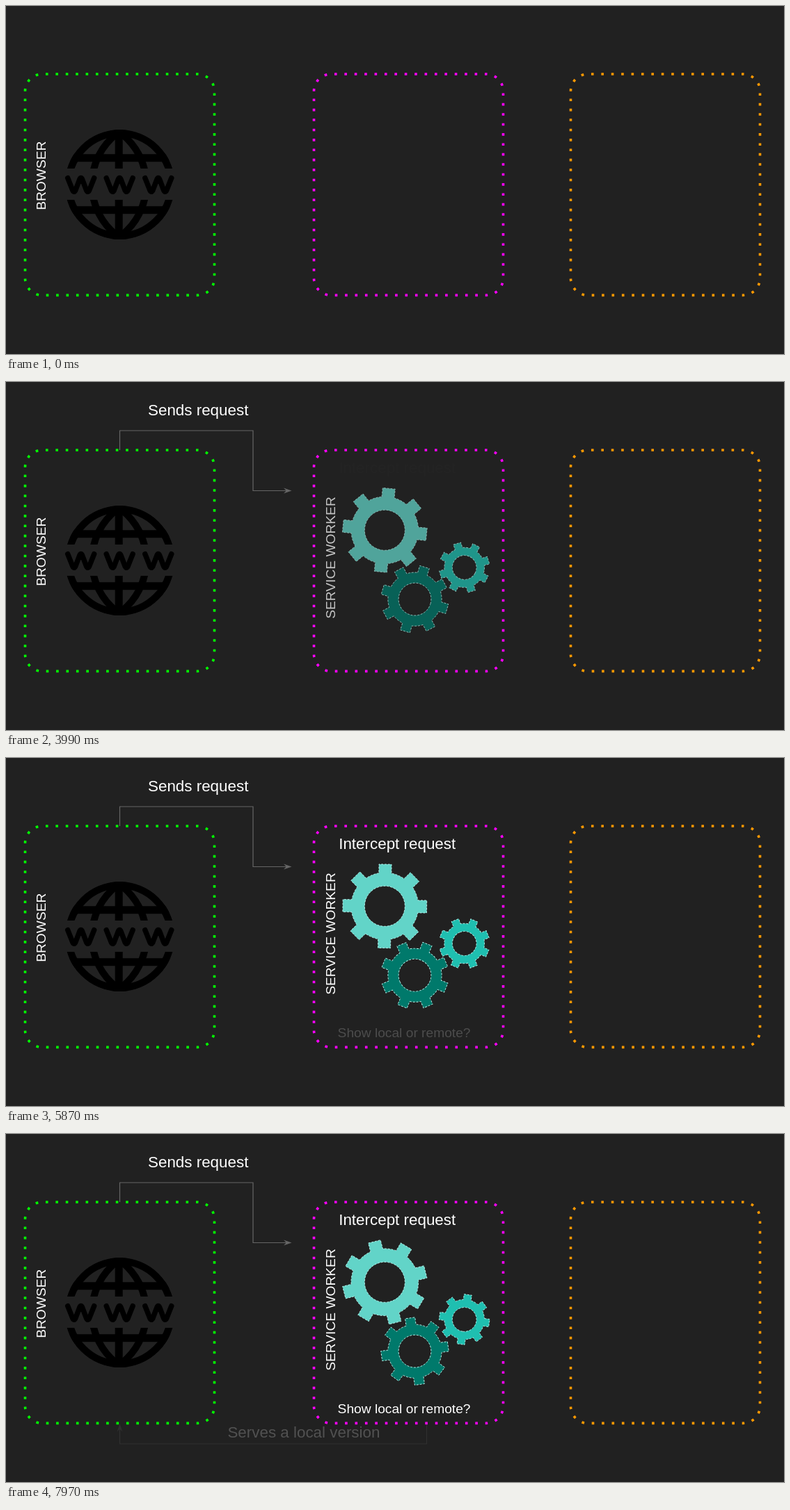
Animation, 1118 px wide and 501 px high, one loop 8000 ms. Source, as an HTML page:

```html
<!DOCTYPE html>
<html lang="en">
<head>
<meta charset="utf-8">
<title>Service worker request flow</title>
<style>
  html, body { margin: 0; width: 100%; height: 100%; overflow: hidden; background: #212121; }
  svg { display: block; width: 1118px; height: 501px; }
  text { fill: #fff; font: 22.4px "Liberation Sans", Arial, sans-serif; white-space: pre; }
  .small { font-size: 19.2px; }
  .panel { fill: none; stroke-width: 3.6; stroke-dasharray: 3.6 10.8; }
  .line { fill: none; stroke: #666; stroke-width: 1.2; }
  .head { fill: #666; }
  .gear { stroke: #b4efe8; stroke-width: .9; stroke-dasharray: 3 1.8; fill-rule: evenodd; }
</style>
</head>
<body>
<svg viewBox="0 0 1118 501" xmlns="http://www.w3.org/2000/svg">
  <defs>
    <clipPath id="caps"><path d="M80 170H250V234H80ZM80 279H250V345H80Z"/></clipPath>
    <clipPath id="disc"><circle cx="163.5" cy="257" r="79"/></clipPath>
    <path id="w" d="M0 0 L7.2 18 Q9 21.5 11 18 L17.2 1.8 Q19 -2 20.8 1.8 L27 18 Q29 21.5 30.8 18 L38 0"/>
  </defs>
  <g id="panels"></g>

  <g clip-path="url(#caps)">
    <g clip-path="url(#disc)" fill="none" stroke="#000">
      <circle cx="163.5" cy="257" r="74" stroke-width="10.5"/>
      <circle cx="216.5" cy="257" r="93" stroke-width="10"/>
      <circle cx="108.5" cy="257" r="93" stroke-width="10"/>
      <path stroke-width="11" d="M162.2 178V336M80 218.7H250M80 293.8H250"/>
    </g>
  </g>
  <g fill="none" stroke="#000" stroke-width="7.4" stroke-linecap="round" stroke-linejoin="round">
    <use href="#w" x="88.7" y="247.6"/>
    <use href="#w" x="144.2" y="247.6"/>
    <use href="#w" x="199.8" y="247.6"/>
  </g>
  <text class="small" transform="translate(57.4 293.8) rotate(-90)">BROWSER</text>

  <g id="send">
    <path class="line" d="M163.5 98V70H355V156.5H404"/>
    <path class="head" d="M410.5 156.5L399 160.4L402.8 156.5L399 152.6Z"/>
    <text x="204" y="48">Sends request</text>
  </g>
  <g id="worker">
    <text class="small" transform="translate(472.5 340.8) rotate(-90)">SERVICE WORKER</text>
    <g id="gears"></g>
  </g>
  <text id="intercept" x="478.2" y="131.3">Intercept request</text>
  <text id="choose" class="small" x="476.6" y="402">Show local or remote?</text>
  <g id="serve">
    <path class="line" d="M604.5 414V446H163.5V424"/>
    <path class="head" d="M163.5 417L167.4 428.5L163.5 424.7L159.6 428.5Z"/>
    <text x="318.4" y="437">Serves a local version</text>
  </g>
</svg>
<script>
const LOOP = 8000;
const byId = id => document.getElementById(id);

function add(parent, attrs) {
  const el = document.createElementNS("http://www.w3.org/2000/svg", "path");
  for (const key in attrs) el.setAttribute(key, attrs[key]);
  parent.appendChild(el);
  return el;
}

// Rounded panels; the dotted line starts at the top of the left side.
function panel(x, stroke) {
  const r = 24.5, arc = `a${r} ${r} 0 0 1 `;
  const d = `M${x} ${98 + r}${arc}${r} ${-r}h223${arc}${r} ${r}v269.4` +
            `${arc}${-r} ${r}h-223${arc}${-r} ${-r}Z`;
  add(byId("panels"), { d, stroke, class: "panel" });
}
panel(27.5, "#0f0");
panel(442.5, "#f0f");
panel(811.5, "#f90");

function gearPath(tip, body, hole, width) {
  const half = width / 2, base = Math.sqrt(body * body - half * half);
  let d = "";
  for (let i = 0; i < 8; i++) {
    const a = i * Math.PI / 4, c = Math.cos(a), s = Math.sin(a);
    const at = (x, y) => `${(x * c - y * s).toFixed(2)} ${(x * s + y * c).toFixed(2)}`;
    d += (i ? `A${body} ${body} 0 0 1 ` : "M") + at(-half, -base) +
         `L${at(-half, -tip)}L${at(half, -tip)}L${at(half, -base)}`;
  }
  return d + `A${body} ${body} 0 0 1 ${-half} ${-base}Z` +
    `M${hole} 0A${hole} ${hole} 0 1 0 ${-hole} 0A${hole} ${hole} 0 1 0 ${hole} 0Z`;
}

// dir and offset relate each wheel to the large one.
const gears = [
  { x: 544.3, y: 213.3, size: [60.3, 48.3, 29, 18], fill: "#62d4c8", dir: 1, offset: 0 },
  { x: 587.5, y: 312.7, size: [48.3, 38.6, 23.4, 14.2], fill: "#00796b", dir: -1, offset: 22.5 },
  { x: 658.7, y: 267, size: [36, 28.8, 17.4, 11], fill: "#1fbfb0", dir: 1, offset: 22.5 }
];
for (const g of gears)
  g.el = add(byId("gears"), { d: gearPath(...g.size), fill: g.fill, class: "gear" });

// The picture advances in discrete steps: [start, steps until the next start].
const beats = [[0, 1], [1010, 9], [2450, 11], [3270, 11], [4140, 11], [5000, 11],
               [5870, 11], [6730, 11], [7580, 11], [8438, 1]];

function hold(t) {
  let i = beats.length - 2;
  while (beats[i][0] > t) i--;
  const [start, count] = beats[i];
  const step = (beats[i + 1][0] - start) / count;
  const n = Math.min(count - 1, Math.floor((t - start) / step + 0.15));
  return start + n * step;
}

// [id, start, end] of each fade-in
const fades = [["send", 900, 2420], ["worker", 2480, 4530], ["intercept", 3970, 5720],
               ["choose", 5500, 7430], ["serve", 7560, 9460]];

function draw(time) {
  const t = hold(time % LOOP);
  for (const [id, from, to] of fades)
    byId(id).setAttribute("opacity", Math.max(0, Math.min(1, (t - from) / (to - from))));
  const turn = 0.7 + 5 * (58 - Math.floor(t / 69.4 + 0.44));
  for (const g of gears)
    g.el.setAttribute("transform",
      `translate(${g.x} ${g.y}) rotate(${g.offset + g.dir * turn})`);
}

const begin = performance.now();
function tick() {
  draw(performance.now() - begin);
  requestAnimationFrame(tick);
}
tick();
</script>
</body>
</html>
```
